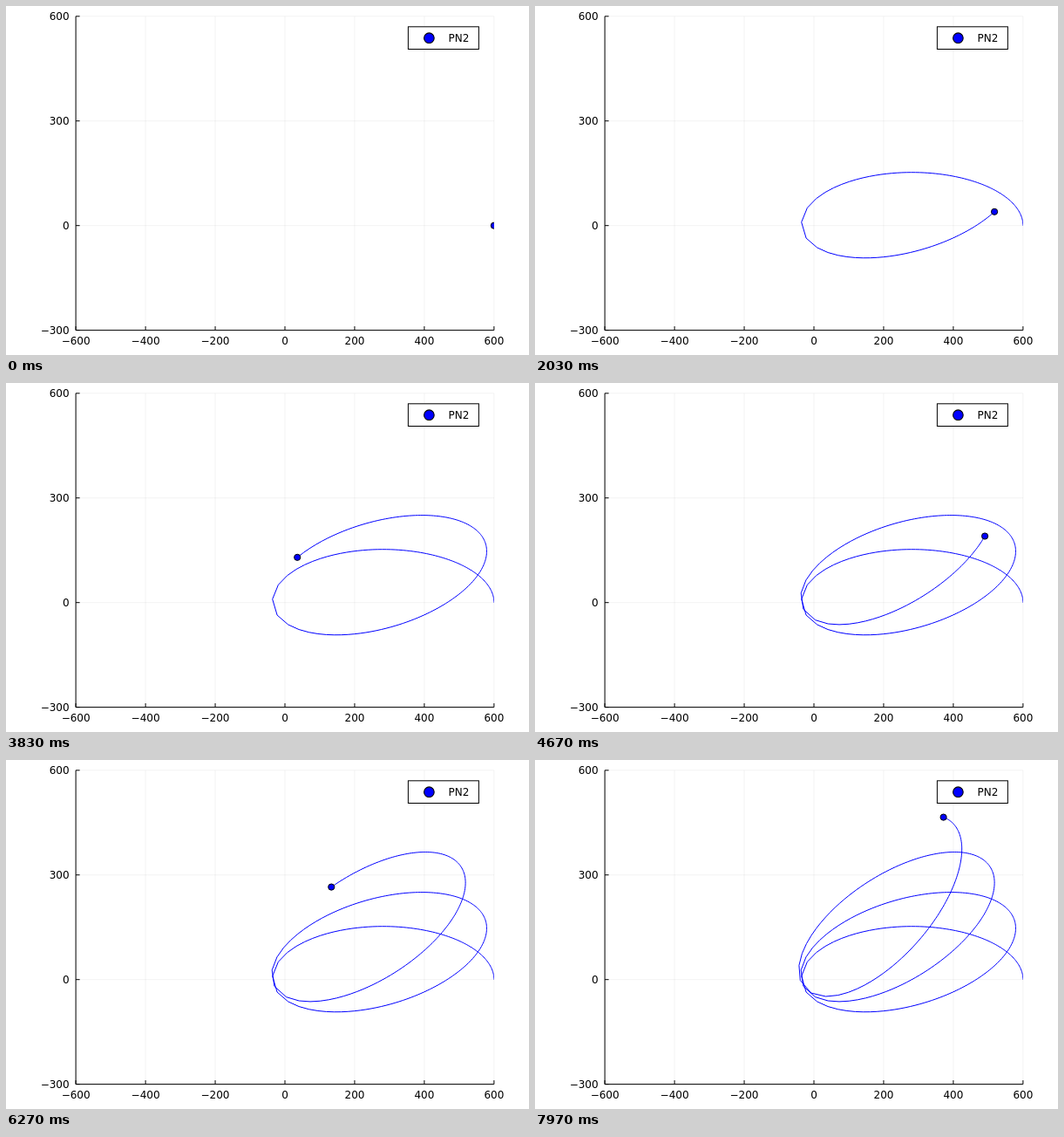
Recreate the animation shown at these times as an HTML page. Size 600x400 px, loop 8 s.

```html
<!DOCTYPE html>
<html lang="en">
<head>
<meta charset="utf-8">
<title>Precessing orbit</title>
<style>
  html, body { margin: 0; width: 100%; height: 100%; overflow: hidden; background: #fff; }
  svg { display: block; width: 600px; height: 400px; }
  text { font: 12px "DejaVu Sans", sans-serif; }
  .grid { stroke: #000; stroke-opacity: .1; stroke-width: .5; }
  .axis { stroke: #000; fill: none; }
  .dot { fill: #00f; stroke: #000; }
  #trail { fill: none; stroke: #00f; stroke-linejoin: round; }
</style>
</head>
<body>
<svg viewBox="0 0 600 400">
  <clipPath id="area"><rect x="80.1" y="11.8" width="479.8" height="359.8"/></clipPath>
  <g id="grid"></g>
  <g id="axes"></g>
  <g clip-path="url(#area)">
    <polyline id="trail"/>
    <circle id="body" class="dot" r="3.6"/>
  </g>
  <rect x="461.4" y="23.8" width="81" height="25.7" fill="#fff" stroke="#000"/>
  <circle class="dot" cx="485.4" cy="36.7" r="5.8" stroke-width="1.1"/>
  <text x="507.6" y="41">PN2</text>
</svg>
<script>
const SCALE = 0.3998, LEFT = 80.1, RIGHT = 559.9, TOP = 11.8, BOTTOM = 371.6;
const px = x => 320 + SCALE * x;
const py = y => 251.68 - SCALE * y;
const $ = id => document.getElementById(id);

function add(parent, tag, attrs, text = '') {
  const node = document.createElementNS('http://www.w3.org/2000/svg', tag);
  for (const key in attrs) node.setAttribute(key, attrs[key]);
  node.textContent = text;
  parent.append(node);
}
const line = (parent, cls, x1, y1, x2, y2) => add(parent, 'line', { class: cls, x1, y1, x2, y2 });
const label = v => String(v).replace('-', '\u2212');

for (let v = -600; v <= 600; v += 200) {
  const x = px(v);
  line($('grid'), 'grid', x, TOP, x, BOTTOM);
  line($('axes'), 'axis', x, BOTTOM, x, BOTTOM - 4.5);
  add($('axes'), 'text', { x, y: 387.6, 'text-anchor': 'middle' }, label(v));
}
for (let v = -300; v <= 600; v += 300) {
  const y = py(v);
  line($('grid'), 'grid', LEFT, y, RIGHT, y);
  line($('axes'), 'axis', LEFT, y, LEFT + 4.5, y);
  add($('axes'), 'text', { x: 72.6, y: y + 4.4, 'text-anchor': 'end' }, label(v));
}
add($('axes'), 'path', { class: 'axis', d: `M${LEFT} ${TOP}V${BOTTOM}H${RIGHT}` });

// Quasi-Keplerian orbit: an ellipse whose apsides advance each revolution.
const orbit = { a: 317.9, e: 0.8875, eTime: 0.877, advance: 1.0452, period: 78.3 };

function position(step) {
  const { a, e, eTime, advance, period } = orbit;
  const phase = step / period + 0.5;
  const turn = Math.round(phase);
  const mean = 2 * Math.PI * (phase - turn);
  let lo = -Math.PI, hi = Math.PI;
  for (let i = 0; i < 40; i++) {
    const mid = (lo + hi) / 2;
    if (mid - eTime * Math.sin(mid) < mean) lo = mid; else hi = mid;
  }
  const r = a * (1 - e * Math.cos(lo));
  const anomaly = 2 * Math.atan(Math.sqrt((1 + e) / (1 - e)) * Math.tan(lo / 2));
  const angle = advance * (2 * Math.PI * (turn - 0.5) + anomaly);
  return [px(r * Math.cos(angle)), py(r * Math.sin(angle))];
}

const LOOP = 8000, STEPS = 240;
// Two trail points per animation step.
const points = Array.from({ length: 2 * STEPS }, (_, i) => position(i / 2).map(v => v.toFixed(2)));

let shown = -1;
function draw(now) {
  const tick = Math.floor((now % LOOP) / 10);
  const step = Math.min(STEPS - 1, Math.floor((tick + 0.5) * 0.3));
  if (step !== shown) {
    shown = step;
    const [cx, cy] = points[2 * step];
    $('trail').setAttribute('points', points.slice(0, 2 * step + 1).join(' '));
    $('body').setAttribute('cx', cx);
    $('body').setAttribute('cy', cy);
  }
}

let start;
function loop(now) {
  start ??= now;
  draw(Math.max(0, now - start));
  requestAnimationFrame(loop);
}
draw(0);
requestAnimationFrame(loop);
</script>
</body>
</html>
```
